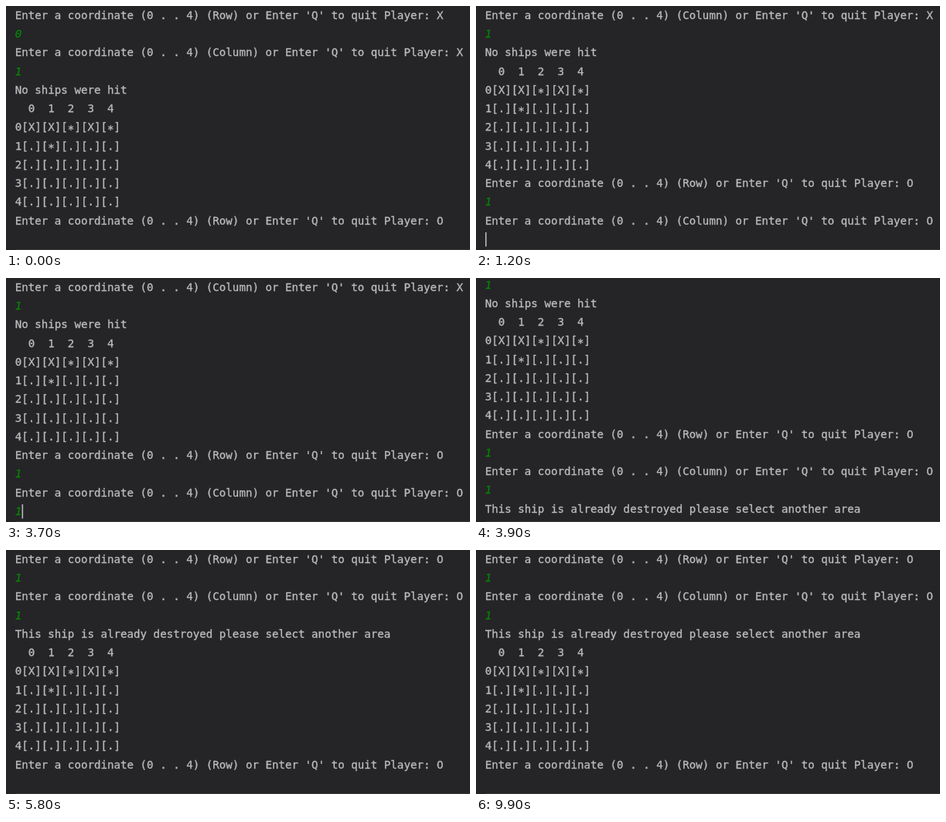
Recreate the animation shown at these times as an HTML page with a canvas. Size 600 px wide and 317 px high, loop 10000 ms.

```html
<!DOCTYPE html>
<html lang="en">
<head>
<meta charset="utf-8">
<title>Battleships console</title>
<style>
  html, body { margin: 0; height: 100%; overflow: hidden; background: #252427; }
  canvas { display: block; }
</style>
</head>
<body>
<canvas id="console" width="600" height="317"></canvas>
<script>
const ctx = document.getElementById('console').getContext('2d');
const LEFT = 11.7, CELL = 8.52, PITCH = 24.25, BASELINE = 16.95, BOTTOM_ROW = 12;
const LOOP = 10000, STEP = 100, BLINK = 508.5, BLINK_START = 300, HOLD = 700;
const BACKGROUND = '#252427';
const FONT = '14.15px "DejaVu Sans Mono", monospace';

const prompt = (axis, player) =>
  `Enter a coordinate (0 . . 4) (${axis}) or Enter 'Q' to quit Player: ${player}`;
const input = text => ({ text, typed: true });
const board = [
  '  0  1  2  3  4',
  '0[X][X][*][X][*]',
  '1[.][*][.][.][.]',
  ...[2, 3, 4].map(row => row + '[.]'.repeat(5))
];
const lines = [
  prompt('Row', 'X'), input('0'),
  prompt('Column', 'X'), input('1'),
  'No ships were hit', ...board,
  prompt('Row', 'O'), input('1'),
  prompt('Column', 'O'), input('1'),
  'This ship is already destroyed please select another area', ...board,
  prompt('Row', 'O')
];

const keyTimes = [700, 3700];
// Scroll position in lines, reached at each time
const scrollPath = [
  { at: 700, to: 0 }, { at: 1000, to: 1 }, { at: 1200, to: 2 },
  { at: 3700, to: 2 }, { at: 3900, to: 3.14 }, { at: 4000, to: 11 }
];

function scrollAt(time) {
  const next = scrollPath.findIndex(point => point.at > time);
  if (next < 0) return scrollPath.at(-1).to;
  if (next === 0) return scrollPath[0].to;
  const a = scrollPath[next - 1], b = scrollPath[next];
  return a.to + (b.to - a.to) * (time - a.at) / (b.at - a.at);
}

// The caret blinks steadily but stays solid for a while after a key press.
function caretVisible(time) {
  const held = keyTimes.some(key => time >= key && time < key + HOLD);
  const phase = Math.floor((time + STEP - 1 - BLINK_START) / BLINK);
  return held || (phase >= 0 && phase % 2 === 0);
}

function drawLine(line, y) {
  ctx.font = line.typed ? 'italic ' + FONT : FONT;
  ctx.fillStyle = ctx.strokeStyle = line.typed ? '#078407' : '#bcbcbc';
  ctx.lineWidth = 0.3;
  [...(line.text || line)].forEach((char, i) => {
    // Asterisks sit on the middle of the line.
    const glyph = [char, LEFT + i * CELL, y + (char === '*' ? 2.6 : 0)];
    ctx.fillText(...glyph);
    ctx.strokeText(...glyph);
  });
}

function draw(time) {
  const scroll = scrollAt(time);
  const caretRow = BOTTOM_ROW + Math.ceil(scroll);
  const column = keyTimes.includes(time) ? 1 : 0;
  ctx.fillStyle = BACKGROUND;
  ctx.fillRect(0, 0, 600, 317);
  lines.slice(0, caretRow + column).forEach((line, row) =>
    drawLine(line, BASELINE + (row - scroll) * PITCH));
  if (caretVisible(time)) {
    ctx.fillStyle = '#b8b8b8';
    ctx.fillRect(12 + column * CELL, 294 + (caretRow - scroll - BOTTOM_ROW) * PITCH, 1.6, 18.5);
  }
  // Lower edge of the console pane
  ctx.fillStyle = BACKGROUND;
  ctx.fillRect(0, 314, 600, 3);
  ctx.fillStyle = '#38383a';
  ctx.fillRect(12, 316, 588, 1);
}

const start = performance.now();
function tick() {
  const time = (performance.now() - start) % LOOP;
  draw(Math.floor(time / STEP) * STEP);
  requestAnimationFrame(tick);
}
tick();
</script>
</body>
</html>
```
